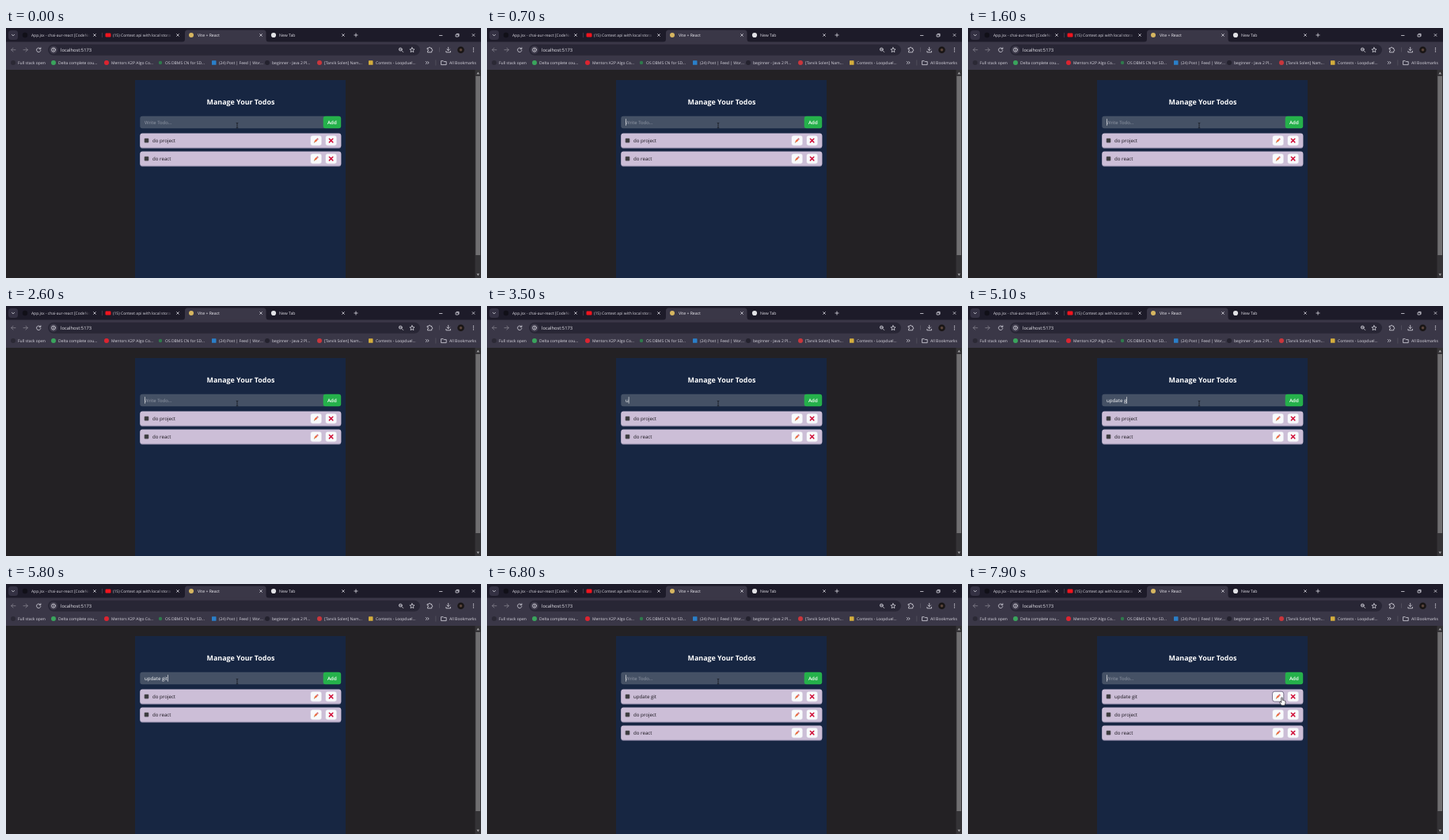
An HTML page that plays this animation: 600x317 px, repeating every 8000 ms.

```html
<!DOCTYPE html>
<html lang="en">
<head>
<meta charset="utf-8">
<title>Manage Your Todos</title>
<style>
  html, body { margin: 0; width: 100%; height: 100%; overflow: hidden; background: #232124; }
  svg { display: block; width: 100vw; height: 100vh; }
  text { font-family: "Open Sans", "Noto Sans", sans-serif; white-space: pre; text-rendering: geometricPrecision; }
  .line { fill: none; stroke: #d9d7e0; stroke-width: .8; stroke-linecap: round; stroke-linejoin: round; }
</style>
</head>
<body>
<svg id="stage" viewBox="0 0 600 317">
  <defs>
    <linearGradient id="fade">
      <stop offset="0" stop-color="#1d1b29" stop-opacity="0"/>
      <stop offset="1" stop-color="#1d1b29"/>
    </linearGradient>
    <g id="close"><path class="line" d="M-1.4-1.4 1.4 1.4M1.4-1.4-1.4 1.4"/></g>
    <g id="pencil" transform="rotate(45)">
      <rect x="-1.1" y="-3.6" width="2.2" height="1.3" rx=".4" fill="#e0526d"/>
      <rect x="-1.1" y="-2.4" width="2.2" height=".7" fill="#9a9aa5"/>
      <rect x="-1.1" y="-1.7" width="2.2" height="3.5" fill="#f0643a"/>
      <path d="M-1.1 1.8H1.1L0 3.8Z" fill="#d9a066"/>
      <path d="M-.4 3.1H.4L0 3.8Z" fill="#333"/>
    </g>
    <g id="cross"><path d="M-2.2-2.2 2.2 2.2M2.2-2.2-2.2 2.2" stroke="#d0103a" stroke-width="1.5" stroke-linecap="round"/></g>
  </defs>
  <g id="browser"></g>
  <g id="app"></g>
  <g id="pointer">
    <path id="beam" d="M-1.3-3.2Q0-3.2 0-2.4Q0-3.2 1.3-3.2M0-2.4V2.6M-1.3 3.4Q0 3.4 0 2.6Q0 3.4 1.3 3.4" fill="none" stroke="#15181f" stroke-width=".8"/>
    <path id="arrow" d="M0 0V8L1.9 6.3 3.1 9 4.3 8.5 3.1 5.8H5.7Z" fill="#fff" stroke="#111" stroke-width=".5"/>
    <path id="hand" d="M-1.3-4.2Q-.4-5 .3-4.1V-1.2Q1.2-1.7 1.7-.8Q2.6-1.1 3-.2Q4-.3 4 .7V2.6L3 5.4H-1L-3.5 1.7Q-3.4.5-2.3.9L-1.3 1.9Z" fill="#fff" stroke="#17151d" stroke-width=".7" stroke-linejoin="round"/>
  </g>
</svg>
<script>
const $ = id => document.getElementById(id);
const LOOP = 8000, ADDED = 6000, ROW_STEP = 23;

function add(parent, tag, attrs, content) {
  const el = document.createElementNS('http://www.w3.org/2000/svg', tag);
  for (const key in attrs) el.setAttribute(key, attrs[key]);
  if (content) el.textContent = content;
  return parent.appendChild(el);
}
const rect = (p, x, y, width, height, fill, rx = 0, more = {}) =>
  add(p, 'rect', { x, y, width, height, fill, rx, ...more });
const dot = (p, cx, cy, r, fill, more = {}) => add(p, 'circle', { cx, cy, r, fill, ...more });
const line = (p, d, more = {}) => add(p, 'path', { class: 'line', d, ...more });
const label = (p, x, y, size, fill, content, more = {}) =>
  add(p, 'text', { x, y, 'font-size': size, fill, ...more }, content);
const use = (p, id, x, y) =>
  add(add(p, 'g', { transform: `translate(${x} ${y})` }), 'use', { href: '#' + id });

function drawTabs(g) {
  rect(g, 0, 0, 600, 18, '#1d1b29');
  rect(g, 3, 3, 12, 12, '#343143', 3.5);
  line(g, 'M7.4 8.3 9 9.9 10.6 8.3');
  add(g, 'path', { fill: '#3a3747', d: 'M222 18Q226 18 226 14V6Q226 2.5 229.500 2.500H325Q328.500 2.500 328.500 6V14Q328.500 18 332.500 18Z' });
  const ink = '#dddbe3';
  label(g, 32, 11, 4.95, ink, 'App.jsx - chai-aur-react [CodeNook');
  label(g, 135, 11, 5, ink, '(15) Context api with local stora');
  for (const x of [97, 201]) rect(g, x, 3, 9, 12, 'url(#fade)');
  for (const x of [106, 210]) rect(g, x, 3, 14, 12, '#1d1b29');
  label(g, 242, 11, 5.15, '#f0eef4', 'Vite + React');
  label(g, 345, 11, 5.15, ink, 'New Tab');
  dot(g, 24, 9, 3.2, '#111018');
  rect(g, 125.500, 6.500, 7, 5, '#f0141e', 1.2);
  dot(g, 234, 9, 3, '#d6b660');
  dot(g, 338, 9, 3.1, '#e2e2e6');
  for (const x of [112, 217, 322, 426]) use(g, 'close', x, 9);
  rect(g, 121, 6, .6, 6, '#55525f');
  line(g, 'M439.900 9H444.100M442 6.900V11.100');
  line(g, 'M547.500 9.500H551M568.500 8.200H571.300V11H568.500ZM569.300 7.400H572.100V10.200');
  use(g, 'close', 590.500, 9);
}

function drawToolbar(g) {
  rect(g, 0, 17.500, 600, 36, '#3a3747');
  rect(g, 53, 20.700, 470, 14, '#282635', 7);
  const dim = { style: 'stroke:#85828f' };
  line(g, 'M12 27.700H6.700M9 25.300 6.600 27.700 9 30.100', dim);
  line(g, 'M22 27.700H27.300M25 25.300 27.400 27.700 25 30.100', dim);
  line(g, 'M43.500 26.300A2.700 2.700 0 1 0 43.900 28.500M43.900 24.900V26.700H42');
  dot(g, 60, 27.700, 5, '#3f3c4c');
  dot(g, 60, 27.700, 2.500, 'none', { class: 'line' });
  line(g, 'M60 27.600V29M60 26.400V26.500');
  label(g, 69, 29.700, 5.8, '#ebe9f0', 'localhost:5173');
  dot(g, 498.300, 27.100, 1.900, 'none', { class: 'line' });
  line(g, 'M499.800 28.600 501.700 30.500M497.500 27.100H499.100');
  const star = Array.from({ length: 10 }, (_, i) => {
    const a = Math.PI * (i / 5 - .5), r = i % 2 ? 1.500 : 3.200;
    return `${513 + r * Math.cos(a)},${28 + r * Math.sin(a)}`;
  });
  add(g, 'polygon', { class: 'line', points: star.join(' ') });
  line(g, 'M532.500 25.500H534A1.100 1.100 0 0 1 536.200 25.500H537.700V27A1.100 1.100 0 0 1 537.700 29.200V30.800H532.500V29.200A1.100 1.100 0 0 0 532.500 27Z');
  rect(g, 547.300, 24.500, .6, 6, '#5f5c6a');
  line(g, 'M558.700 24.500V28.500M556.900 26.900 558.700 28.700 560.500 26.900M555.900 29.300V30.800H561.500V29.300');
  dot(g, 574.500, 27.700, 4.300, '#1a1616');
  dot(g, 574.500, 27.700, 1.800, '#59443a');
  for (const y of [25.500, 27.700, 29.900]) dot(g, 590.500, y, .65, '#d9d7e0');
}

function drawBookmarks(g) {
  [
    [15, 'Full stack open', '#2b2935'],
    [66, 'Delta complete cou...', '#3aa45c'],
    [133, 'Mentors K2P Algo Co...', '#dc2430'],
    [201, 'OS DBMS CN for SD...', '#2f7a4c'],
    [269, '(24) Post | Feed | Wor...', '#2a7fc9'],
    [336, 'beginner - Java 2 Pl...', '#24222e'],
    [402, '[Tarvik Solen] Nam...', '#c8363c'],
    [467, 'Contests - Loopduel...', '#d3ad3d']
  ].forEach(([x, name, color], i) => {
    if (i === 4 || i === 7) rect(g, x - 9, 41.300, 5.500, 5.500, color, .6);
    else dot(g, x - 6, 44, i === 3 ? 2.200 : 3, color);
    label(g, x, 46, 5.02, '#d9d7e0', name);
  });
  line(g, 'M530.300 42.500 531.800 44 530.300 45.500M532.700 42.500 534.200 44 532.700 45.500');
  rect(g, 542.600, 40.500, .6, 7, '#5f5c6a');
  line(g, 'M550 41.700H552.300L553.200 42.600H556.200V46.600H550Z');
  label(g, 560, 46, 5.08, '#d9d7e0', 'All Bookmarks');
}

function drawPage(g) {
  rect(g, 0, 53, 600, 264, '#232124');
  rect(g, 592.500, 53, 7.500, 264, '#343336');
  rect(g, 593.300, 61, 5.700, 227, '#706f71');
  add(g, 'path', { fill: '#a5a4a7', d: 'M594.500 58.500H598L596.250 55.800ZM594.500 311.500H598L596.250 314.200Z' });
  rect(g, 163, 66, 266, 251, '#172642');
}

function drawRow(parent, y, name) {
  const g = add(parent, 'g', { transform: `translate(0 ${y})` });
  rect(g, 169.300, 1, 254, 18.300, '#807e9c', 3);
  rect(g, 169.300, 0, 254, 18.300, '#ccbed7', 3);
  rect(g, 174.900, 6.600, 5.200, 5.200, '#3b3b3d', .7, { stroke: '#6b6670', 'stroke-width': .5 });
  label(g, 185, 11.500, 6.15, '#17131b', name);
  for (const x of [384.500, 403.500]) rect(g, x, 2.700, 14.300, 13, '#f8fafc', 3, { stroke: '#c0b2cc', 'stroke-width': .4 });
  use(g, 'pencil', 391.600, 9.200);
  use(g, 'cross', 410.600, 9.200);
  return g;
}

drawTabs($('browser'));
drawToolbar($('browser'));
drawBookmarks($('browser'));
drawPage($('browser'));

const app = $('app');
label(app, 296.500, 96.800, 8.9, '#fff', 'Manage Your Todos', { 'font-weight': 700, 'text-anchor': 'middle' });
rect(app, 169.300, 111.800, 236, 15.500, '#455165', 3);
rect(app, 400.700, 111.800, 22.500, 15.500, '#25b14b', 3);
label(app, 411.900, 121.900, 6.1, '#fff', 'Add', { 'font-weight': 600, 'text-anchor': 'middle' });
const placeholder = label(app, 175, 121.900, 5.9, '#949ba8', 'Write Todo...');
const typed = label(app, 175, 121.900, 6.15, '#fff', '');
const caret = rect(app, 175, 115.200, .6, 8.500, '#fff');
const newRow = drawRow(app, 133.500, 'update git');
const hover = rect(newRow, 384.500, 2.700, 14.300, 13, 'none', 3, { stroke: '#5b5270', 'stroke-width': .7 });
const oldRows = add(app, 'g', {});
drawRow(oldRows, 133.500, 'do project');
drawRow(oldRows, 133.500 + ROW_STEP, 'do react');

const TYPING = [[0, ''], ...[3500, 3800, 4000, 4200, 4500, 4700, 4900, 5100, 5400, 5700]
  .map((time, i) => [time, 'update git'.slice(0, i + 1)]), [ADDED, '']];
// Clicking shows the caret, which blinks every 500 ms and stays lit while typing.
const CARET = [[0, 0], [600, 1], [1100, 0], [1600, 1], [2100, 0], [2600, 1], [3100, 0],
  [3500, 1], [6300, 0], [6800, 1], [7300, 0], [7800, 1]];
const POINTER = [[0, 'beam', 292, 123.500], [7600, 'beam', 306, 125], [7700, 'arrow', 342, 134],
  [7800, 'arrow', 379, 144], [7900, 'hand', 397, 148.500]];
const at = (steps, time) => steps.findLast(step => step[0] <= time);
const show = (el, on) => el.setAttribute('visibility', on ? 'visible' : 'hidden');

function render(time) {
  const content = at(TYPING, time)[1];
  if (typed.textContent !== content) typed.textContent = content;
  show(placeholder, !content);
  show(caret, at(CARET, time)[1]);
  caret.setAttribute('x', 175 + (content ? typed.getComputedTextLength() : 0));
  const added = time >= ADDED;
  newRow.style.display = added ? '' : 'none';
  oldRows.setAttribute('transform', `translate(0 ${added ? ROW_STEP : 0})`);
  const [, shape, x, y] = at(POINTER, time);
  for (const id of ['beam', 'arrow', 'hand']) show($(id), id === shape);
  $('pointer').setAttribute('transform', `translate(${x} ${y})`);
  show(hover, shape === 'hand');
}

const start = performance.now();
function tick() {
  render((performance.now() - start) % LOOP);
  requestAnimationFrame(tick);
}
tick();
</script>
</body>
</html>
```
